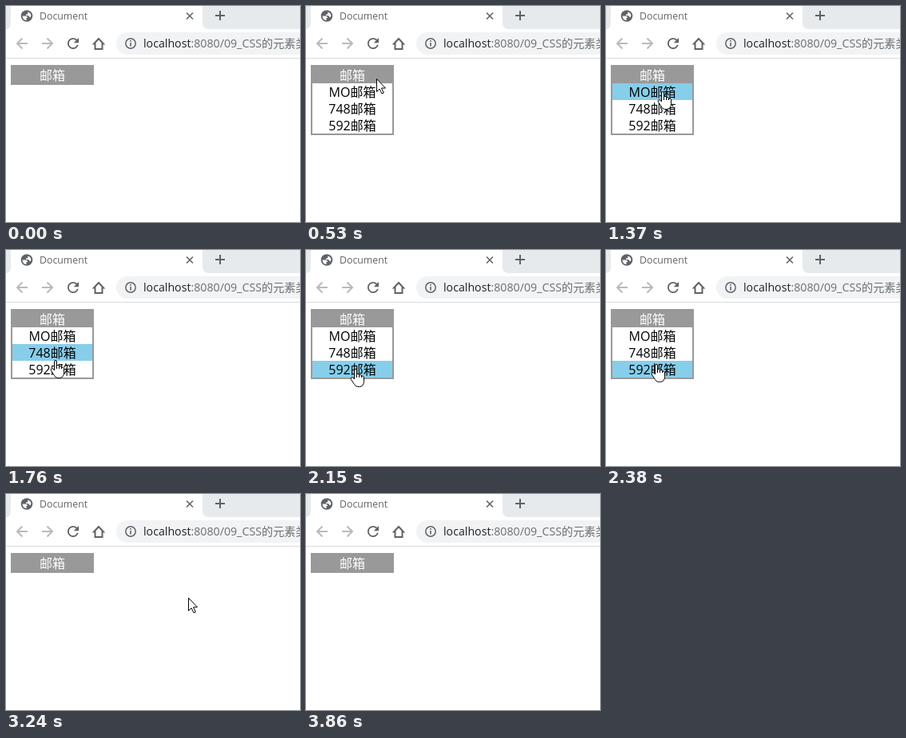
An HTML page for the animation above (4.32 s loop, 368 by 271 pixels).

```html
<!DOCTYPE html>
<html lang="zh-CN">
<head>
<meta charset="utf-8">
<title>Document</title>
<style>
  html, body { margin: 0; width: 100%; height: 100%; overflow: hidden; background: #fff; }
  svg { display: block; }
  text { font: 16px "Open Sans", "Noto Sans CJK SC", sans-serif; }
  .mid { text-anchor: middle; }
  .line { fill: none; stroke: #5f6368; stroke-width: 2; }
</style>
</head>
<body>
<svg width="368" height="271" viewBox="0 0 368 271">
  <!-- tab strip -->
  <path fill="#e7eaed" d="M0 0H6V21Q6 29 0 29ZM246 0H368V29H254Q246 29 246 21Z"/>
  <circle cx="26" cy="12.500" r="7.300" fill="#5f6368"/>
  <path fill="#fff" d="M20.500 12.500h4q2.500 0 2.500 2.500h-1.500v3q-4.500-.5-5-5.500zM27.500 7.500q3.500 1 4 5l-1.500 2-2-2.500h-3v-1.500h2z"/>
  <text x="42" y="17" fill="#5f6368" style="font-size:12.3px">Document</text>
  <path class="line" style="stroke-width:1.6" d="M226 8.500l8 8m0-8l-8 8"/>
  <path class="line" d="M262 12h12M268 6v12"/>

  <!-- toolbar -->
  <path class="line" style="stroke:#bababa" d="M27 47H14M20.500 40.500L14 47l6.500 6.500M45 47h13M51.500 40.500L58 47l-6.500 6.500"/>
  <path fill="#5f6368" transform="translate(73.5 36.500) scale(.875)" d="M17.65 6.35A7.96 7.96 0 0 0 12 4a8 8 0 1 0 7.73 10h-2.08A6 6 0 0 1 12 18a6 6 0 1 1 0-12c1.66 0 3.14.69 4.22 1.78L13 11h7V4z"/>
  <path class="line" d="M110 47.500l6-6.500 6 6.500h-1.500V54h-9v-6.500z"/>
  <rect x="138" y="33" width="260" height="28" rx="14" fill="#f1f3f4"/>
  <circle class="line" style="stroke-width:1.5" cx="156" cy="47" r="6.2"/>
  <path class="line" style="stroke-width:1.6" d="M156 46v4.500M156 43v1.700"/>
  <text x="172" y="52" fill="#6b6f73" style="font-size:14.2px"><tspan fill="#202124">localhost</tspan>:8080/09_CSS的元素类</text>
  <path fill="#dcdcdc" d="M0 65h368v1H0z"/>

  <!-- page -->
  <rect x="6" y="74" width="104" height="25" fill="#999"/>
  <g id="menu">
    <path fill="#999" d="M6 74h104v88H6z"/>
    <path fill="#fff" d="M8 97h100v63H8z"/>
    <rect id="glow" x="8" width="100" height="21" fill="skyblue"/>
    <text class="mid" x="58" y="114">MO邮箱</text>
    <text class="mid" x="58" y="135">748邮箱</text>
    <text class="mid" x="58" y="156">592邮箱</text>
  </g>
  <text class="mid" x="58" y="93" fill="#fff" style="font-weight:500">邮箱</text>
  <path id="cursor" fill="#fff" stroke="#000"/>
</svg>
<script>
const LOOP = 4320;
const SHAPES = {
  arrow: "M.5.5V16.500L4 13l3 6 2.300-1L6.500 12h5z",
  beam: "M-2.500-7.500h6M.5-7.500v15M-2.500 7.500h6",
  hand: "M-1.500 12V2q0-1.500 1.500-1.500t1.500 1.500V7q1.500-1.500 3 0v1q1.500-1.200 3 .3v1q2-.8 3 .8V15.500q0 7-6 7H2.500q-2.500 0-4-3l-4-6q-1-2 .5-2.800t3.500 2.300zM1.500 7v4M4.500 8v3M7.500 9v2"
};

// Pointer moves: start, end, number of steps, target x, y
const ENTRY = [207, 219];
const MOVES = [
  [220, 600, 6, 79, 81],
  [1080, 1600, 8, 62, 132],
  [1680, 1830, 3, 62, 140],
  [2000, 2150, 3, 62, 149],
  [2310, 2610, 5, 70, 88],
  [3010, 3240, 4, 228, 130],
  [3640, 3860, 4, 323, 273]
];

const $ = id => document.getElementById(id);
const show = (el, on) => el.setAttribute("visibility", on ? "visible" : "hidden");
const smooth = s => s * s * (3 - 2 * s);

function pointer(t) {
  let [x, y] = ENTRY;
  for (const [start, end, steps, toX, toY] of MOVES) {
    if (t < start) break;
    const step = Math.min(steps, 1 + Math.floor((t - start) * (steps - 1) / (end - start)));
    const s = smooth(step / steps);
    x += (toX - x) * s;
    y += (toY - y) * s;
  }
  return [Math.round(x), Math.round(y)];
}

function draw(t) {
  const [x, y] = pointer(t);
  const open = x >= 6 && x < 110 && y >= 74 && y < 162;
  const item = Math.floor((y - 97) / 21);
  const onItem = open && item >= 0 && item < 3;
  const onTitle = open && item < 0 && x > 41 && x < 75;

  show($("menu"), open);
  show($("glow"), onItem);
  $("glow").setAttribute("y", 97 + 21 * item);

  const cursor = $("cursor");
  show(cursor, t >= MOVES[0][0] && t < 3860);
  cursor.setAttribute("d", SHAPES[onItem ? "hand" : onTitle ? "beam" : "arrow"]);
  cursor.setAttribute("transform", `translate(${x} ${y})`);
}

const begin = performance.now();
function tick() {
  draw((performance.now() - begin) % LOOP);
  requestAnimationFrame(tick);
}
tick();
</script>
</body>
</html>
```
